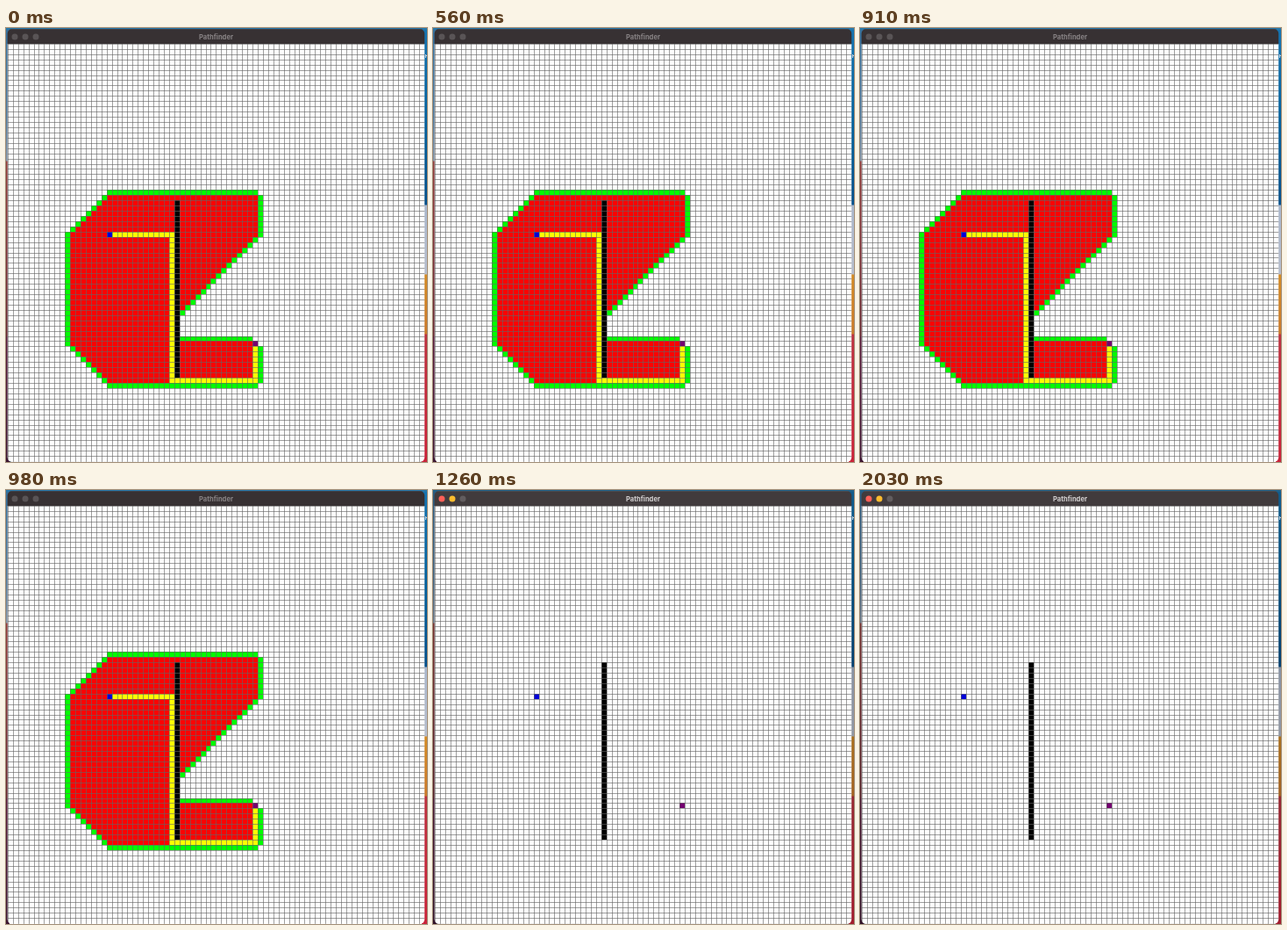
Write an HTML page with a canvas that moves like this. It is 480x494 px and loops after 2100 ms.

```html
<!DOCTYPE html>
<html>
<head>
<meta charset="utf-8">
<style>
html, body { margin: 0; width: 480px; height: 494px; overflow: hidden; background: #123; }
canvas { display: block; }
</style>
</head>
<body>
<canvas id="stage" width="480" height="494"></canvas>
<script>
const ctx = document.getElementById('stage').getContext('2d');
const LOOP = 2100, FOCUS_AT = 1190, CLEAR_AT = 1260;
const N = 80, PITCH = 5.94, BAR = 18;

// Grid lines and cell edges sit on whole pixels.
const colX = c => Math.floor(2.3 + c * PITCH);
const rowY = r => Math.floor(18.4 + r * PITCH);

function fill(color, c0, r0, c1 = c0, r1 = r0) {
  const x = colX(c0), y = rowY(r0);
  ctx.fillStyle = color;
  ctx.fillRect(x, y, colX(c1 + 1) - x, rowY(r1 + 1) - y);
}

function drawSearch() {
  const red = '#f00', green = '#0f0', yellow = '#ff0';
  // visited cells, with the frontier around them
  for (let r = 29; r <= 64; r++) {
    const edge = r < 36 ? 47 - r : r > 57 ? r - 46 : 11;
    fill(red, edge + 1, r, 31, r);
    fill(green, edge, r);
  }
  fill(red, 32, 29, 47, 36);
  for (let r = 37; r <= 51; r++) {
    if (r < 51) fill(red, 33, r, 83 - r, r);
    fill(green, 84 - r, r);
  }
  fill(red, 33, 57, 46, 63);
  fill(green, 19, 28, 47, 28);
  fill(green, 48, 29, 48, 36);
  fill(green, 33, 56, 46, 56);
  fill(green, 48, 58, 48, 64);
  fill(green, 19, 65, 47, 65);
  // shortest path
  fill(yellow, 20, 36, 31, 36);
  fill(yellow, 31, 36, 31, 64);
  fill(yellow, 31, 64, 47, 64);
  fill(yellow, 47, 58, 47, 64);
}

function drawBoard(solved) {
  ctx.fillStyle = '#fff';
  ctx.fillRect(0, BAR, 480, 480);
  if (solved) drawSearch();
  fill('#000', 32, 30, 32, 63);
  fill('#0000d8', 19, 36);
  fill('#740070', 47, 57);
  ctx.fillStyle = 'rgba(100,100,100,0.62)';
  for (let i = 0; i < N; i++) {
    ctx.fillRect(colX(i), BAR, 1, 480);
    ctx.fillRect(0, rowY(i), 480, 1);
  }
}

function strip(x, y, w, h, stops) {
  const g = ctx.createLinearGradient(0, y, 0, y + h);
  stops.forEach(([at, color]) => g.addColorStop(at / h, color));
  ctx.fillStyle = g;
  ctx.fillRect(x, y, w, h);
}

function drawDesktop(focused) {
  strip(0, 0, 4, 494, [[0, '#356f9a'], [100, '#4d7596'], [151, '#7b8c9f'],
    [152, '#8d3937'], [250, '#7b3036'], [350, '#64242d'], [352, '#571a38'], [494, '#3c1530']]);
  strip(474, 0, 6, 494, [[0, '#1674b0'], [100, '#06629d'], [201, '#07508a'],
    [202, '#a9b6cb'], [280, '#b5bccb'], [281, '#d28a25'], [348, '#c9792a'],
    [349, '#bb3340'], [494, '#c92339']]);
  ctx.fillStyle = '#2878aa';
  ctx.fillRect(0, 0, 480, 2);
  if (focused) {
    ctx.fillStyle = 'rgba(0,0,0,0.2)';
    ctx.fillRect(0, 0, 480, 494);
  }
  ctx.fillStyle = '#b9cddd';
  ctx.fillRect(478, 30, 1, 4);
  ctx.fillRect(478, 31, 2, 1);
}

function drawTitleBar(focused) {
  ctx.fillStyle = focused ? '#413b3d' : '#373133';
  ctx.fillRect(0, 0, 480, BAR);
  ctx.fillStyle = focused ? '#575153' : '#484244';
  ctx.fillRect(0, 1, 480, 0.8);
  const lights = focused ? ['#ff5f57', '#febc2e', '#625d5f'] : ['#595456', '#595456', '#595456'];
  lights.forEach((color, i) => {
    ctx.fillStyle = color;
    ctx.beginPath();
    ctx.arc(10 + 12 * i, 10, 3.5, 0, Math.PI * 2);
    ctx.fill();
  });
  ctx.fillStyle = focused ? '#d6d3d4' : '#898486';
  ctx.font = '700 7.6px Inter, sans-serif';
  ctx.textAlign = 'center';
  ctx.textBaseline = 'alphabetic';
  ctx.fillText('Pathfinder', 239.5, 12.5);
}

function draw(t) {
  const focused = t >= FOCUS_AT;
  drawDesktop(focused);
  ctx.save();
  ctx.beginPath();
  ctx.roundRect(1.7, 1.2, 475.5, 492.6, 5);
  ctx.clip();
  drawBoard(t < CLEAR_AT);
  drawTitleBar(focused);
  ctx.restore();
}

const start = performance.now();
function tick() {
  draw((performance.now() - start) % LOOP);
  requestAnimationFrame(tick);
}
tick();
</script>
</body>
</html>
```
